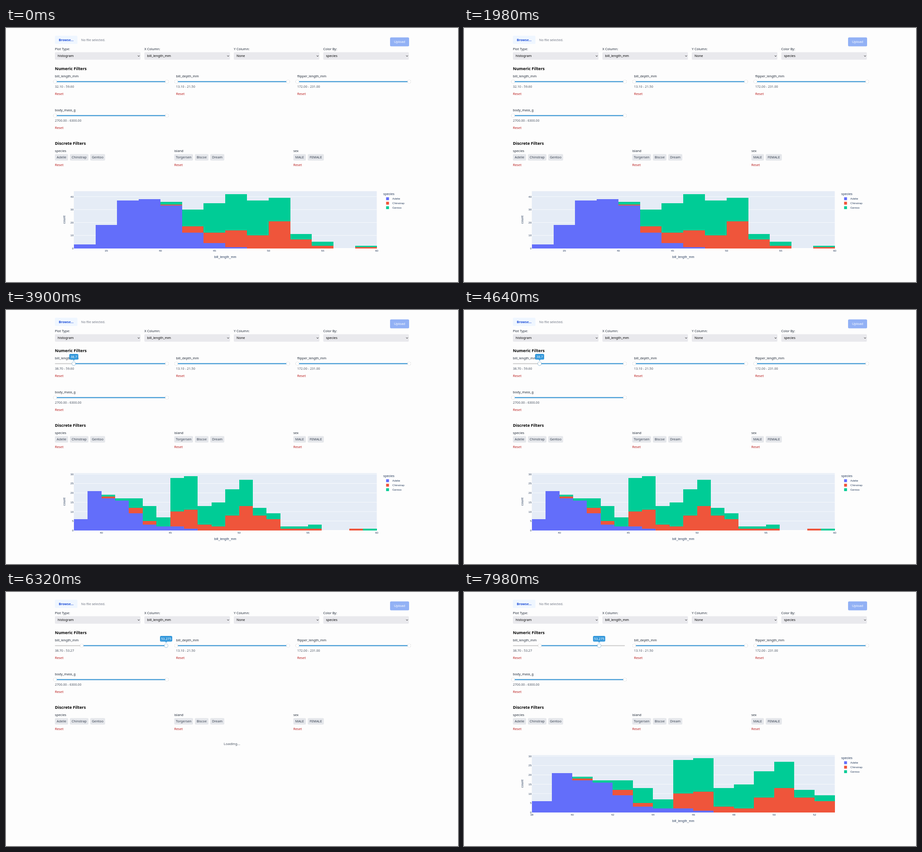
An HTML page that plays this animation: 998 px wide and 561 px high, repeating every 8000 ms.

```html
<!DOCTYPE html>
<html lang="en">
<head>
<meta charset="utf-8">
<title>Data explorer</title>
<style>
  html, body { margin: 0; width: 100%; height: 100%; overflow: hidden; background: #fdfdfd; }
  svg { display: block; }
  text { font: 7.28px "Noto Sans", "Open Sans", sans-serif; fill: #1f2937; white-space: pre; }
  .label { font-weight: 500; }
  .head { font-size: 9.1px; font-weight: 600; fill: #000; }
  .value { font-size: 7.1px; fill: #4b5563; }
  .hint { font-size: 7.1px; fill: #6b7280; }
  .reset { fill: #b91c1c; }
  .chip { fill: #374151; }
  .browse { font-weight: 600; fill: #1d4ed8; }
  .white { fill: #fff; }
  .pick { font-size: 7.35px; fill: #000; }
  .loading { font-size: 7.9px; fill: #4b5563; }
  .axis, .tick { font-family: "Liberation Sans", Arial, sans-serif; fill: #2a3f5f; }
  .tick { font-size: 6.24px; }
  .dot { fill: #fff; filter: drop-shadow(.3px .3px .55px rgba(0,0,0,.55)); }
  .bars path { shape-rendering: crispEdges; }
</style>
</head>
<body>
<svg id="stage" width="998" height="561" viewBox="0 0 998 561"></svg>
<script>
const LOOP = 8000, RAIL = 247.2, BLUE = "#3498db";
const COLORS = ["#636efa", "#ef553b", "#00cc96"];
const SPECIES = ["Adelie", "Chinstrap", "Gentoo"];

const text = (x, y, str, cls = "", anchor = "start", extra = "") =>
  `<text x="${x}" y="${y}" class="${cls}" text-anchor="${anchor}" ${extra}>${str}</text>`;
const rect = (x, y, w, h, fill, r = 0, extra = "") =>
  `<rect x="${x}" y="${y}" width="${w}" height="${h}" rx="${r}" fill="${fill}" ${extra}/>`;
const dot = (x, y, extra = "") => `<circle class="dot" cx="${x}" cy="${y}" r="3.75" ${extra}/>`;

// ---- form ----
function select(x, label, value) {
  return text(x, 48.6, label, "label") + rect(x, 53.5, 189, 16.6, "#e9e9ed", 2) +
    text(x + 6, 64.4, value, "pick") +
    `<path d="M${x + 183} 60.8l2 2.1 2-2.1" fill="none" stroke="#111" stroke-width="1"/>`;
}

function slider(x, y, label, range, live) {
  const id = name => live ? `id="${name}"` : "";
  return text(x, y - 9.4, label, "label") +
    rect(x, y - 1, RAIL, 2, "#ccc", 1) +
    rect(x, y - 1, RAIL, 2, BLUE, 1, id("span")) +
    (live ? `<circle id="halo" cy="${y}" r="4.8" fill="${BLUE}" opacity=".36"/>` : "") +
    dot(x + .3, y, id("low")) + dot(x + RAIL, y, id("high")) +
    text(x, y + 13.8, range, "value", "start", id("range")) +
    text(x, y + 29.5, "Reset", "reset");
}

function chips(x, label, items) {
  let out = text(x, 273.7, label, "label") + text(x, 304.7, "Reset", "reset");
  for (const [name, left, right] of items)
    out += rect(left, 278.4, right - left, 14.4, "#e5e7eb", 2) +
      text((left + right) / 2, 288.3, name, "chip", "middle");
  return out;
}

// ---- histogram: stacked tops for each series ----
const coarse = { lo: 32, hi: 60, bin: 2, first: 35, step: 5, yStep: 10, tops: [
  [3, 18, 37, 38, 33, 12, 4, 1],
  [3, 18, 37, 38, 34, 17, 12, 14, 10, 21, 7, 2, 0, 1],
  [3, 18, 37, 38, 36, 30, 35, 42, 37, 39, 11, 5, 0, 2]] };
const fine = { lo: 38, hi: 60, bin: 1, first: 40, step: 5, yStep: 5, tops: [
  [6, 21, 17, 16, 9, 3, 2, 2, 1],
  [6, 21, 18, 16, 12, 5, 2, 10, 11, 3, 2, 8, 13, 8, 6, 1, 1, 1, 0, 0, 1, 0],
  [6, 21, 19, 17, 17, 13, 7, 28, 29, 13, 15, 22, 27, 12, 9, 2, 2, 3, 0, 0, 1, 1]] };
const cropped = { ...fine, hi: 53, first: 38, step: 2 };

function chart({ lo, hi, bin, first, step, yStep, tops }) {
  const left = 149.8, width = 668.8, base = 486.7, height = 126.3;
  const yMax = Math.max(...tops[2]) * 20 / 19;
  const px = v => left + (v - lo) / (hi - lo) * width;
  const py = v => base - v / yMax * height;
  let out = rect(left, base - height, width, height, "#e5ecf6");
  for (let v = 0; v < yMax; v += yStep)
    out += `<path d="M${left} ${py(v)}h${width}" stroke="#fff" stroke-width="${v ? .7 : 1}"/>` +
      text(149.2, py(v) + 2.2, v, "tick", "end");
  out += '<g class="bars">';
  tops.forEach((row, s) => {
    let d = "";
    for (let i = 0; i < (hi - lo) / bin; i++) {
      const under = s ? tops[s - 1][i] || 0 : 0, top = row[i] || 0, x = lo + i * bin;
      if (top > under) d += `M${px(x)} ${py(under)}V${py(top)}H${px(x + bin)}V${py(under)}z`;
    }
    out += `<path d="${d}" fill="${COLORS[s]}"/>`;
  });
  out += "</g>";
  for (let v = first; v <= hi; v += step) out += text(px(v), 493.6, v, "tick", "middle");
  out += text(484.2, 507.8, "bill_length_mm", "axis", "middle") +
    text(0, 0, "count", "axis", "middle", 'transform="translate(131.3 423.3) rotate(-90)"') +
    text(833, 369.2, "species", "axis");
  SPECIES.forEach((name, i) => {
    const y = 377 + i * 9.9;
    out += rect(839.3, y - 3.1, 6.3, 6.3, COLORS[i]) + text(853, y + 2.2, name, "tick");
  });
  return out;
}

const stage = document.getElementById("stage");
stage.innerHTML =
  rect(108, 17, 49.6, 18.2, "#eff6ff", 2) + text(132.8, 29, "Browse…", "browse", "middle") +
  text(166, 29, "No file selected.", "hint") +
  rect(848, 20.8, 42, 19.8, "#92b1f5", 2.5) + text(869, 33.4, "Upload", "label white", "middle") +
  select(108, "Plot Type:", "histogram") + select(305.5, "X Column:", "bill_length_mm") +
  select(503, "Y Column:", "None") + select(700.5, "Color By:", "species") +
  text(108, 93.2, "Numeric Filters", "head") +
  slider(108, 118.6, "bill_length_mm", "", true) +
  slider(375.5, 118.6, "bill_depth_mm", "13.10 - 21.50") +
  slider(643, 118.6, "flipper_length_mm", "172.00 - 231.00") +
  slider(108, 193.4, "body_mass_g", "2700.00 - 6300.00") +
  text(108, 257.6, "Discrete Filters", "head") +
  chips(108, "species", [["Adelie", 108, 137.2], ["Chinstrap", 141, 182], ["Gentoo", 186, 218.8]]) +
  chips(371.5, "island", [["Torgersen", 371.5, 413], ["Biscoe", 417, 447], ["Dream", 451, 482]]) +
  chips(634.5, "sex", [["MALE", 634.5, 662.2], ["FEMALE", 666.2, 701.8]]) +
  `<g id="tip">${rect(0, 97, 20, 12.6, BLUE, 2.5, 'id="tipBox"')}
   <path d="M-2.6 109.4h5.2l-2.6 2.7z" fill="${BLUE}"/>${text(0, 105.9, "", "white", "middle", 'id="tipText"')}</g>` +
  text(499, 338, "Loading...", "loading", "middle", 'id="loading"') +
  [coarse, fine, cropped].map(c => `<g>${chart(c)}</g>`).join("").replace(/<g><rect/g, '<g class="plot"><rect');

const $ = id => document.getElementById(id);
const plots = [...document.querySelectorAll(".plot")];
const show = (el, on) => el.setAttribute("visibility", on ? "visible" : "hidden");
const set = (el, attrs) => { for (const k in attrs) el.setAttribute(k, attrs[k]); };

// CSS "ease" curve, solved by bisection
function ease(x) {
  if (x <= 0) return 0;
  if (x >= 1) return 1;
  let a = 0, b = 1, m = .5;
  for (let i = 0; i < 24; i++) {
    m = (a + b) / 2;
    if (.75 * m * (1 - m) + m ** 3 < x) a = m; else b = m;
  }
  return .3 * m * (1 - m) ** 2 + 3 * m * m * (1 - m) + m ** 3;
}

// two clicks on the rail; the handle glides while the plot reloads
const GLIDE = 1540;
const clicks = [
  { at: 3200, glide: 3265, ready: 3500, lag: .06 },
  { at: 6250, glide: 6250, ready: 6550, lag: 0 }
];
const progress = (c, t) => t < c.at ? 0 : ease(Math.max(c.lag, (t - c.glide) / GLIDE));
const place = v => 108 + (v - 32.1) / 27.5 * RAIL;

function draw(t) {
  const [a, b] = clicks;
  const low = 108.3 + (place(38.7) - 108.3) * progress(a, t);
  const high = place(59.6) + (place(53.275) - place(59.6)) * progress(b, t);
  const second = t >= b.at, active = t >= a.at;
  const focus = second ? high : low, half = second ? 13.5 : 10;

  set($("span"), { x: low, width: high - low });
  set($("low"), { cx: low });
  set($("high"), { cx: high });
  set($("halo"), { cx: focus });
  set($("tip"), { transform: `translate(${focus} 0)` });
  set($("tipBox"), { x: -half, width: half * 2 });
  $("tipText").textContent = second ? "53.275" : "38.7";
  $("range").textContent = (active ? "38.70" : "32.10") + " - " + (second ? "53.27" : "59.60");
  show($("halo"), active);
  show($("tip"), active);

  const busy = clicks.some(c => t >= c.at && t < c.ready);
  const current = second ? 2 : active ? 1 : 0;
  show($("loading"), busy);
  plots.forEach((p, i) => show(p, !busy && i === current));
}

function tick() {
  draw(performance.now() % LOOP);
  requestAnimationFrame(tick);
}
tick();
</script>
</body>
</html>
```
